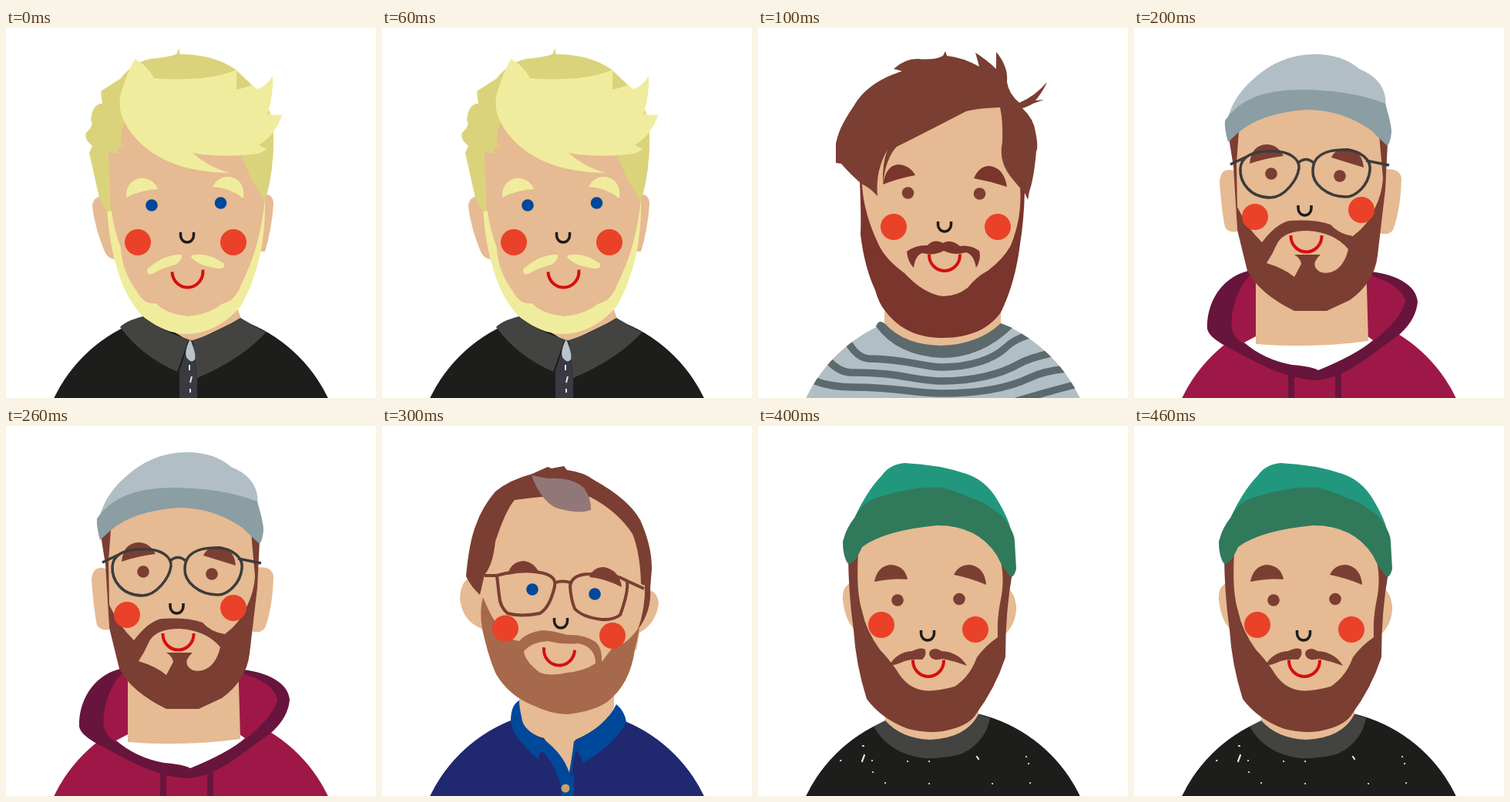
An HTML page without scripts for the animation above (500 ms loop, 480 by 480 pixels).

```html
<!DOCTYPE html>
<html lang="en">
<head>
<meta charset="utf-8">
<title>Bearded portraits</title>
<style>
  html, body { margin: 0; width: 100%; height: 100%; overflow: hidden; background: #fff; }
  svg { display: block; width: 100vw; height: 100vh; }

  .portrait {
    visibility: hidden;
    animation: turn 500ms step-end infinite;
    animation-delay: calc(var(--turn) * 100ms - 500ms);
  }
  @keyframes turn {
    0% { visibility: visible; }
    20%, 100% { visibility: hidden; }
  }

  .skin { fill: #e6ba92; }
  .brown { fill: #7b3e33; }
  .russet { fill: #7a352c; }
  .tan { fill: #a6694b; }
  .blond { fill: #f0ec9d; }
  .straw { fill: #dad37b; }
  .blue { fill: #00489a; }
  .navy { fill: #20286f; }
  .black { fill: #1d1d1b; }
  .charcoal { fill: #434341; }
  .mist { fill: #b2bec5; }
  .slate { fill: #8a9ea4; }
  .steel { fill: #5c6a6e; }
  .berry { fill: #9e1847; }
  .plum { fill: #67153d; }
  .cheek { fill: #ea4129; }
  .white { fill: #fff; }
  .line { fill: none; stroke-linejoin: round; }
  .nose { stroke: #1d1d1b; stroke-width: 3.5; }
  .smile { stroke: #d4100f; stroke-width: 4; }
  .stripe { stroke: #5c6a6e; stroke-width: 9.5; }
</style>
</head>
<body>
<svg viewBox="0 0 480 480">
  <defs>
    <circle id="body" cx="240" cy="565" r="197"/>
    <clipPath id="bodyClip"><use href="#body"/></clipPath>
    <circle id="eye" r="7.8"/>
    <circle id="cheek" class="cheek" r="17"/>
    <path id="nose" class="line nose" d="M-8.5 0V4A8.5 9 0 0 0 8.5 4V0"/>
    <path id="smile" class="line smile" d="M-20-1V0A20 20.5 0 0 0 20 0V-1"/>
  </defs>

  <!-- Blond, zipped jacket -->
  <g class="portrait" style="--turn:0">
    <path class="skin" d="M126 218Q112 219 112 232Q116 262 128 290Q132 300 143 300V218ZM334 215Q347 216 347 228Q345 260 336 290H328Z"/>
    <use href="#body" class="black"/>
    <path class="skin" d="M178 370L300 363L305 377L245 406L234 404Z"/>
    <path class="charcoal" d="M148 388Q155 380 178 374Q205 395 237 404L222 446Q175 425 148 388ZM242 405Q270 397 304 376L337 395Q305 430 248 454Z"/>
    <path fill="#3a3a42" d="M238 405L225 445V480H248V454L241 405Z"/>
    <path fill="#b9c4cb" d="M238 405Q231 420 234 427Q240 436 245 430Q247 424 240 406Z"/>
    <path class="line" stroke="#dfe4e8" stroke-width="2" d="M238 437V444M241 452L239 460M239 468V473"/>
    <path class="skin" d="M132 150L155 100H300L336 200V240Q325 320 300 355Q260 392 236 390Q190 390 160 340Q134 280 132 236Z"/>
    <path class="blond" d="M131 234C134 290 150 350 180 376C205 395 225 397 235 397C262 397 290 380 305 360C325 325 337 280 336 222C332 262 322 300 305 333Q298 354 280 358Q262 372 236 374Q205 370 195 357Q180 360 170 342Q150 315 149 285Q140 262 137 238Z"/>
    <path class="straw" d="M121 220L108 162Q110 158 112 153L105 146Q102 138 104 136Q115 125 110 120Q112 98 125 98L123 82L148 66Q165 45 187 40Q210 38 221 34L225 26V34Q270 34 298 54L320 75Q345 95 347 140Q348 185 336 225L318 196L303 160L240 110L154 122Q148 140 149 151L155 152L144 156L148 163L133 160L136 237L131 238Q124 230 121 220Z"/>
    <path class="blond" d="M167 40Q152 70 148 90C145 110 155 130 175 150C205 178 245 187 290 188Q262 180 242 162Q280 169 328 163L339 157L328 152Q350 138 358 113L339 112Q347 88 346 62Q338 76 326 79L319 74Q308 78 299 80V54Q275 65 235 66Q205 67 192 65Q183 48 167 40Z"/>
    <path class="blond" d="M156 220C155 200 170 193 180 195Q193 198 197 209Q175 210 156 220ZM268 206Q275 193 288 193C303 194 310 205 308 221Q290 207 268 206Z"/>
    <g class="blue"><use href="#eye" x="189" y="230"/><use href="#eye" x="278.5" y="227"/></g>
    <use href="#cheek" x="171" y="278"/><use href="#cheek" x="295" y="278"/>
    <use href="#nose" x="235" y="265"/>
    <use href="#smile" transform="translate(235.5 316) rotate(-4)"/>
    <path class="blond" d="M228 294Q205 293 183 313Q182 321 190 319Q205 310 220 307Q230 300 228 294ZM240 295Q262 290 283 306Q284 313 275 312Q255 309 247 303Q240 299 240 295Z"/>
  </g>

  <!-- Swept hair, striped jumper -->
  <g class="portrait" style="--turn:1">
    <use href="#body" class="mist"/>
    <g class="line stripe" clip-path="url(#bodyClip)">
      <path d="M116 406Q128 428 144 429C190 429 215 440 238 440C275 440 305 430 322 414Q332 404 352 398"/>
      <path d="M90 430Q104 446 120 447C180 446 205 458 238 458C280 458 315 449 338 436Q352 428 380 422"/>
      <path d="M74 458Q95 466 125 466C180 466 205 474 238 474C285 474 325 467 352 454Q370 445 400 442"/>
      <path d="M335 484Q375 472 414 462"/>
    </g>
    <path class="skin" d="M164 350V388Q190 414 237 414Q285 414 315 385V350Z"/>
    <path class="steel" d="M153 387Q157 377 165 384Q190 411 237 412Q285 411 315 383L330 389Q290 428 238 428Q180 425 153 387Z"/>
    <path class="skin" d="M134 170L200 100H320L344 210Q342 300 280 345Q240 360 190 340Q136 290 134 205Z"/>
    <path class="russet" d="M132 198Q134 245 133 268Q138 310 152 340Q157 358 165 367C185 393 210 402 240 402C275 402 300 390 315 369Q334 330 340 280Q345 250 346 212L340 206Q343 245 328 282Q318 300 298 315Q284 322 272 337Q258 348 240 348Q215 345 190 318Q165 300 156 280Q137 240 135 203Z"/>
    <path class="brown" d="M101 175V150C105 130 115 115 125 100C140 75 165 63 187 56L176 53Q190 40 207 40Q230 42 240 36L243 30L245 36Q265 38 287 50L282 32Q295 40 309 53V31Q325 50 323 70Q325 85 339 97Q360 88 375 70Q370 82 360 94L371 93L357 98Q348 103 343 104Q358 118 360 135Q364 155 361 160Q358 195 352 212L350 223L346 214Q340 208 332 198Q311 175 317 148Q318 120 314 103Q285 104 270 108Q228 130 180 154Q166 168 162 202Q161 175 168 158Q152 185 155 218Q145 207 134 202Q118 188 108 176Z"/>
    <path class="russet" d="M162 203Q166 178 182 177Q197 178 204 191Q182 195 162 203ZM280 195Q287 179 300 179Q319 181 323 206Q302 199 280 195Z"/>
    <g class="brown"><use href="#eye" x="194.5" y="214"/><use href="#eye" x="287.5" y="215"/></g>
    <use href="#cheek" x="176" y="258"/><use href="#cheek" x="311" y="258"/>
    <use href="#nose" x="242" y="251"/>
    <use href="#smile" x="242" y="294.5"/>
    <path class="russet" d="M240 279Q228 273 220 282Q205 281 193 290Q194 303 202 311Q204 295 213 292Q228 296 241 289Q255 296 270 291Q280 294 283 311Q290 300 287 289Q275 281 262 283Q250 273 240 279Z"/>
  </g>

  <!-- Grey cap, hoodie -->
  <g class="portrait" style="--turn:2">
    <use href="#body" class="berry"/>
    <path class="plum" d="M148 315C110 325 94 360 95 390C98 405 125 415 150 429C190 451 220 457 240 457C275 452 300 430 345 397Q366 378 368 355C366 333 340 319 300 315Z"/>
    <path class="berry" d="M153 318C130 340 125 375 127 390Q130 403 143 410H162V318ZM299 320H304Q346 332 352 354Q347 378 308 408H299Z"/>
    <path class="line" stroke="#67153d" stroke-width="8" d="M204 450V480M265 446V480"/>
    <path class="white" d="M143 408L158 400H303L310 405Q290 423 239 444Q231 439 205 437Q168 430 143 408Z"/>
    <path class="skin" d="M158 320V410Q230 416 304 406L301 300Z"/>
    <path class="skin" d="M130 185Q112 180 111 200Q114 240 118 258Q122 266 134 264ZM322 184Q345 180 347 195Q346 235 336 262Q330 270 318 266Z"/>
    <path class="skin" d="M130 120L220 95L318 120L325 200L315 290L170 300L134 240Z"/>
    <path class="brown" d="M123 142L136 134L133 175L134 232Q147 260 166 278Q185 253 202 250Q235 248 255 255Q265 267 284 270Q304 255 312 235Q322 215 323 195L318 138L329 150L326 210L316 295Q312 330 280 353L250 367H208Q163 345 147 315L134 262L129 180Z"/>
    <path class="skin" d="M186 279Q195 263 225 263Q260 265 278 287Q272 312 255 317Q240 320 235 310Q232 303 242 294H208Q216 299 217 306L208 323Q195 312 172 305Q180 293 186 279Z"/>
    <path class="mist" d="M119 128Q125 92 155 66Q190 34 235 34Q270 34 292 53Q322 65 326 90L327 105Q220 65 119 128Z"/>
    <path class="slate" d="M122 148Q117 130 118 120Q145 80 215 80Q280 80 326 98Q334 125 334 135Q333 147 329 153Q320 145 308 133Q270 106 224 106Q165 110 135 136Z"/>
    <path class="brown" d="M150 176Q152 152 172 151Q186 151 194 166Q170 169 150 176ZM256 168Q262 155 278 156Q296 160 298 181Z"/>
    <g class="brown"><use href="#eye" x="178" y="189"/><use href="#eye" x="267" y="192"/></g>
    <use href="#cheek" x="157" y="245"/><use href="#cheek" x="295" y="236"/>
    <path class="line" stroke="#3c3c3b" stroke-width="3.5" d="M138 182C139 168 152 160 174 160C203 158 215 171 214 182C212 197 195 220 177 220C150 220 137 200 138 182ZM232 185C232 165 250 158 272 158C295 158 308 172 306 185C304 205 287 219 275 219C250 219 231 202 232 185ZM213 175Q223 166 233 175M125 177L146 167M301 172L331 178"/>
    <use href="#nose" x="221.5" y="230"/>
    <use href="#smile" x="223.5" y="270"/>
  </g>

  <!-- Short hair, blue shirt -->
  <g class="portrait" style="--turn:3">
    <use href="#body" class="navy"/>
    <path class="skin" d="M178 350V372Q182 398 210 405L243 450L251 407Q290 390 301 365V335Z"/>
    <path class="blue" d="M178 356Q167 362 167 383Q168 402 202 432L207 421Q222 435 232 465V480H249V452L243 450Q235 425 209 406Q182 395 181 377Q178 365 178 356ZM304 361Q315 370 317 384Q300 415 261 437L252 420Q246 440 247 455L243 450Q247 425 249 409Q290 390 304 361Z"/>
    <circle cx="238" cy="470" r="5.5" fill="#c9a36a"/>
    <path class="skin" d="M125 195Q102 193 101 225Q105 255 132 264ZM340 212Q357 212 359 230Q355 260 328 271Z"/>
    <path class="skin" d="M124 200L150 90H280L338 150L344 215L330 290L250 340L160 320L129 240Z"/>
    <path class="brown" d="M109 195Q113 150 122 128Q130 105 147 85Q165 70 195 62L215 53L220 55L236 52L240 57Q262 60 275 70Q320 95 335 122Q350 155 350 185L348 211Q350 240 332 264Q342 235 341 207L336 205Q335 165 325 140Q305 110 270 92Q225 88 172 96Q160 110 147 150Q144 180 133 193L127 219Q115 208 109 195Z"/>
    <path fill="#917777" d="M194 64L215 68Q245 66 262 80Q272 95 271 109Q255 115 225 106Q205 95 194 64Z"/>
    <path class="tan" d="M131 222Q126 240 130 263Q138 300 148 322Q165 350 195 362Q220 374 240 374Q275 370 292 358Q322 335 328 290Q333 270 334 260Q318 284 298 289L285 306Q286 288 277 280Q262 270 240 271Q220 265 208 265Q187 268 178 279Q165 278 152 262Q140 245 131 222Z"/>
    <path class="skin" d="M184 292Q195 280 215 279Q235 284 255 282Q277 287 277 308Q262 318 240 320Q218 325 205 320Q185 305 184 292Z"/>
    <path class="brown" d="M163 193Q167 176 184 175Q198 177 204 191Q185 188 163 193ZM269 196Q274 183 288 183Q308 187 311 209Q290 198 269 196Z"/>
    <g class="blue"><use href="#eye" x="195" y="212"/><use href="#eye" x="276" y="218"/></g>
    <use href="#cheek" x="160" y="262.5"/><use href="#cheek" x="299" y="272"/>
    <path class="line" stroke="#7b3e33" stroke-width="4" d="M149 194Q180 185 205 190Q227 194 224 208Q218 235 205 243Q180 248 163 243Q153 235 152 220ZM244 208Q246 192 270 192Q300 190 318 201Q320 215 309 245Q300 252 285 251Q260 248 250 237Q245 225 244 208ZM225 203Q235 200 244 203M133 194H150M318 201L340 211"/>
    <use href="#nose" x="232" y="249"/>
    <use href="#smile" transform="translate(230 290) rotate(5)"/>
  </g>

  <!-- Green beanie, speckled shirt -->
  <g class="portrait" style="--turn:4">
    <use href="#body" class="black"/>
    <path class="skin" d="M165 360V384Q185 407 223 409Q270 407 286 375V360Z"/>
    <path class="charcoal" d="M150 390L165 382Q185 405 223 407Q270 405 286 374L301 379Q295 410 265 425Q240 432 215 431Q170 425 150 390Z"/>
    <path class="line" stroke="#e4e4e4" stroke-width="2.2" stroke-linecap="round" d="M136 415h1M148 434h.1M138 427l-3 8M107 434h.5M149 449h.1M165 463h.1M194 435h.1M222 435h.1M222 464h.1M284 429l2 3M348 429h.1M351 438h.1M353 463h.1M304 464h.1"/>
    <path class="skin" d="M120 204Q109 208 110 225Q113 255 128 266ZM320 206Q336 218 335 240Q332 262 318 272Z"/>
    <path class="skin" d="M125 140L230 110L318 150V270L285 330L215 350L170 325L128 240Z"/>
    <path class="brown" d="M117 165Q117 215 124 265Q127 310 141 354Q160 380 195 393Q220 399 240 396Q272 390 282 375Q308 340 321 300Q321 240 330 190L312 165Q322 195 314 230Q310 250 311 274Q295 285 284 300Q275 325 255 338Q230 345 215 343Q193 340 180 317Q168 300 158 290Q140 265 135 240Q127 215 130 165Z"/>
    <path fill="#21987d" d="M120 130Q140 85 160 65Q170 50 190 48Q235 50 270 62Q295 70 310 95Q325 120 328 135Q230 60 120 130Z"/>
    <path fill="#307a5b" d="M117 179Q110 170 110 150Q115 130 127 117Q135 98 158 92Q205 77 240 80Q262 86 275 93Q295 98 318 118Q333 138 333 150L335 185Q333 195 328 196Q315 180 310 168Q285 129 233 129Q165 135 135 157Q125 180 117 179Z"/>
    <path class="brown" d="M151 202Q155 181 173 180Q191 182 194 199Q175 197 151 202ZM254 193Q260 180 275 180Q294 183 296 206Q275 197 254 193Z"/>
    <g class="brown"><use href="#eye" x="181" y="226"/><use href="#eye" x="261" y="224.5"/></g>
    <use href="#cheek" x="160" y="258"/><use href="#cheek" x="282" y="264"/>
    <use href="#nose" x="220" y="265"/>
    <use href="#smile" x="221" y="304.5"/>
    <path class="brown" d="M217 290Q219 298 213 303Q200 302 190 305Q180 310 170 311Q180 293 200 292Q212 286 217 290ZM223 292Q229 286 238 292Q260 293 271 311Q255 305 240 302Q228 305 224 300Q221 296 223 292Z"/>
  </g>
</svg>
</body>
</html>
```
